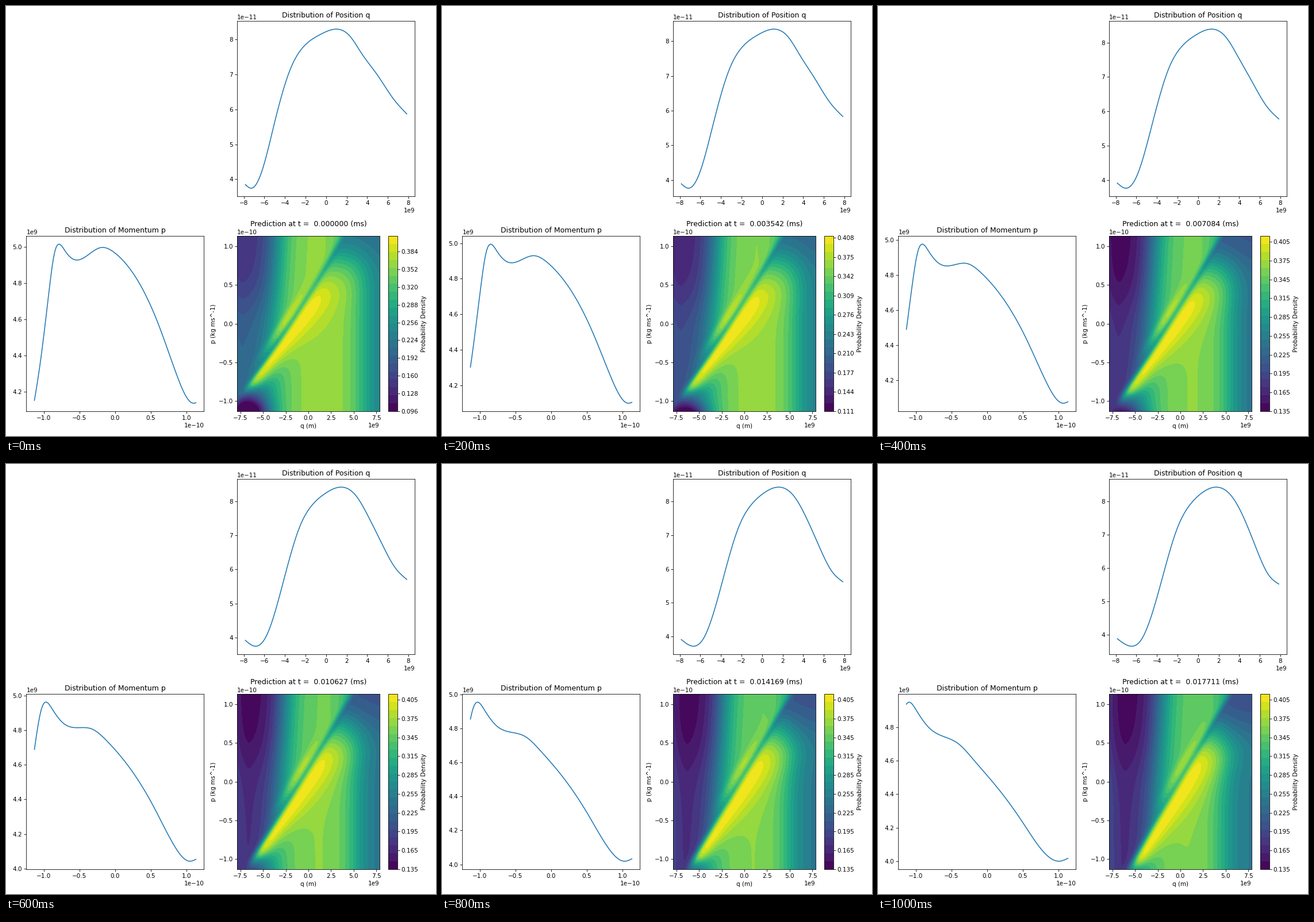
A matplotlib script for the animation above (1200 ms loop, 748 px wide and 748 px high).

```python
import numpy as np
import matplotlib.pyplot as plt
from matplotlib.animation import FuncAnimation
from matplotlib.ticker import MaxNLocator

SIZE = 748
FRAMES = 6
STEP_MS = 0.0035422
Q_MAX, P_MAX = 7.85, 1.13          # in 1e9 m and 1e-10 kg m/s
BANDS = 23

# key points of each curve: x, y at the start, then x, y at the end
POSITION = [
    (-7.85, 3.85, -7.85, 3.88), (-7.28, 3.744, -6.7, 3.665),
    (-6.3, 4.18, -5.5, 3.86), (-5, 5.63, -3.6, 5.56),
    (-3.5, 7.13, -2, 7.21), (-2, 7.85, -.9, 7.85),
    (-.5, 8.15, .2, 8.21), (1, 8.294, 1.75, 8.425),
    (2.3, 8.1, 3.3, 8.14), (3.5, 7.58, 4.5, 7.47),
    (5, 6.98, 5.8, 6.48), (6.5, 6.32, 6.8, 5.82),
    (7.85, 5.87, 7.85, 5.52),
]
MOMENTUM = [
    (-1.17, 4.06, -1.45, 4.1), (-1.05, 4.354, -1.34, 4.45),
    (-.93, 4.74, -1.22, 4.8), (-.85, 4.966, -1.15, 4.92),
    (-.783, 5.016, -1.09, 4.949), (-.7, 4.978, -1, 4.906),
    (-.57, 4.93, -.82, 4.799), (-.2, 4.997, -.4, 4.7),
    (0, 4.966, -.2, 4.61), (.3, 4.825, .15, 4.435),
    (.6, 4.578, .5, 4.23), (.85, 4.305, .78, 4.06),
    (1.09, 4.135, 1.02, 4), (1.13, 4.137, 1.13, 4.017),
]

fig = plt.figure(figsize=(10, 10), dpi=74.8)


def mix(a, b, k):
    return a + (b - a) * k


def sigmoid(z):
    return 1 / (1 + np.exp(-np.clip(z, -50, 50)))


def spline(xs, ys, x):
    """Natural cubic spline through the given points."""
    n, h = len(xs), np.diff(xs)
    slope = np.diff(ys) / h
    matrix, rhs = np.eye(n), np.zeros(n)
    for j in range(1, n - 1):
        matrix[j, j - 1:j + 2] = h[j - 1], 2 * (h[j - 1] + h[j]), h[j]
        rhs[j] = 6 * (slope[j] - slope[j - 1])
    m = np.linalg.solve(matrix, rhs)
    j = np.clip(np.searchsorted(xs, x) - 1, 0, n - 2)
    a, b = xs[j + 1] - x, x - xs[j]
    return ((m[j] * a**3 + m[j + 1] * b**3) / (6 * h[j])
            + (ys[j] / h[j] - m[j] * h[j] / 6) * a
            + (ys[j + 1] / h[j] - m[j + 1] * h[j] / 6) * b)


def density(q, p, s):
    """Phase-space density; s runs from 0 to 1 over the loop."""
    groove = mix(-1.95, -.1, s) + mix(5.6, 5, s) * p - mix(.4, 0, s) * p**2
    u = q - groove

    # field above and left of the groove
    rise = sigmoid((q - mix(-3.8, -2.6, s) - .4 * p) / .9)
    left = .135 + mix(.225, .215, s) * rise
    left += .008 * np.maximum(mix(-7, -5.8, s) - q, 0)**2
    left += (.03 + .03 * (1 - s)**3) * sigmoid((.3 - p) / .2) * (1 - rise)
    left -= .006 * np.maximum(q - mix(1, 2.2, s), 0)**2
    left += mix(.055, .035, s) * np.exp(
        -((u + .8) / .55)**2 - ((p - mix(-.05, .18, s)) / .4)**2)

    # field below and right of it
    floor = mix(.225, .243, s)
    right = floor + (.368 - floor) * sigmoid((mix(6, 4.7, s) - q) / .95)
    right -= .215 * sigmoid(-(q + mix(4.4, 5, s)) / 1.35)
    right = mix(right, mix(.21, .2, s),
                sigmoid((p - mix(.86, .72, s)) / .13))

    # bright ridge beside the groove and the dark well in the corner
    offset = .85 + mix(.8, .2, s) * p
    width = mix(1.9, 2.3, s) + mix(.6, 1.1, s) * p
    along = (sigmoid((mix(.44, .38, s) - p) / .1)
             * sigmoid((p - mix(-.83, -1.08, s)) / .05))
    ridge = along * np.exp(-np.abs((u - offset) / width)**1.5)
    right += np.maximum(.414 - right, 0) * ridge
    right -= .14 * np.exp(-((q + 6.3 - 1.5 * s) / 2)**2
                          - ((p + 1.14 + .42 * s) / .19)**2)

    dip = mix(.055, .04, s) * sigmoid((p + .45) / .12) * sigmoid((1 - p) / .12)
    return mix(left, right, sigmoid(u / .2)) - dip * np.exp(-(u / .42)**2)


def add_axes(x, y, w, h=304.4):
    return fig.add_axes([x / SIZE, 1 - (y + h) / SIZE, w / SIZE, h / SIZE])


def draw_curve(ax, title, keys, s, bulge, x_max, x_unit, y_unit):
    x0, y0, x1, y1 = np.transpose(keys)
    x = np.linspace(-x_max, x_max, 120)
    y = spline(mix(x0, x1, s), mix(y0, y1, s) + bulge * s * (1 - s), x)
    ax.plot(x * x_unit, y * y_unit)
    ax.set_title(title)


def draw_density(i, s):
    q, p = np.meshgrid(np.linspace(-Q_MAX, Q_MAX, 260),
                       np.linspace(-P_MAX, P_MAX, 260))
    low = min(.097 + .0135 * i + .003 * i**2, .136)
    high = .4102 + .0006 * i
    z = np.clip(density(q, p, s), low, high)
    scale = MaxNLocator(101).tick_values(low, high)

    ax = add_axes(402.3, 400.4, 247.2)
    filled = ax.contourf(q * 1e9, p * 1e-10, z,
                         np.linspace(scale[0], scale[-1], BANDS))
    ax.set_title(f"Prediction at t =  {i * STEP_MS:.6f} (ms)")
    ax.set_xlabel("q (m)")
    ax.set_ylabel("p (kg ms^-1)")
    fig.colorbar(filled, cax=add_axes(665.2, 400.4, 15.3),
                 ticks=scale[::-(-len(scale) // 10)],
                 label="Probability Density")


def draw(i):
    s = i / (FRAMES - 1)
    fig.clear()
    draw_curve(add_axes(402.3, 26.4, 308.9), "Distribution of Position q",
               POSITION, s, .2, Q_MAX, 1e9, 1e-11)
    draw_curve(add_axes(35.4, 400.4, 308.9), "Distribution of Momentum p",
               MOMENTUM, s, -.05, P_MAX, 1e-10, 1e9)
    draw_density(i, s)
    return []


anim = FuncAnimation(fig, draw, frames=FRAMES, interval=200,
                     repeat=True, repeat_delay=0, blit=False)
plt.show()
```
